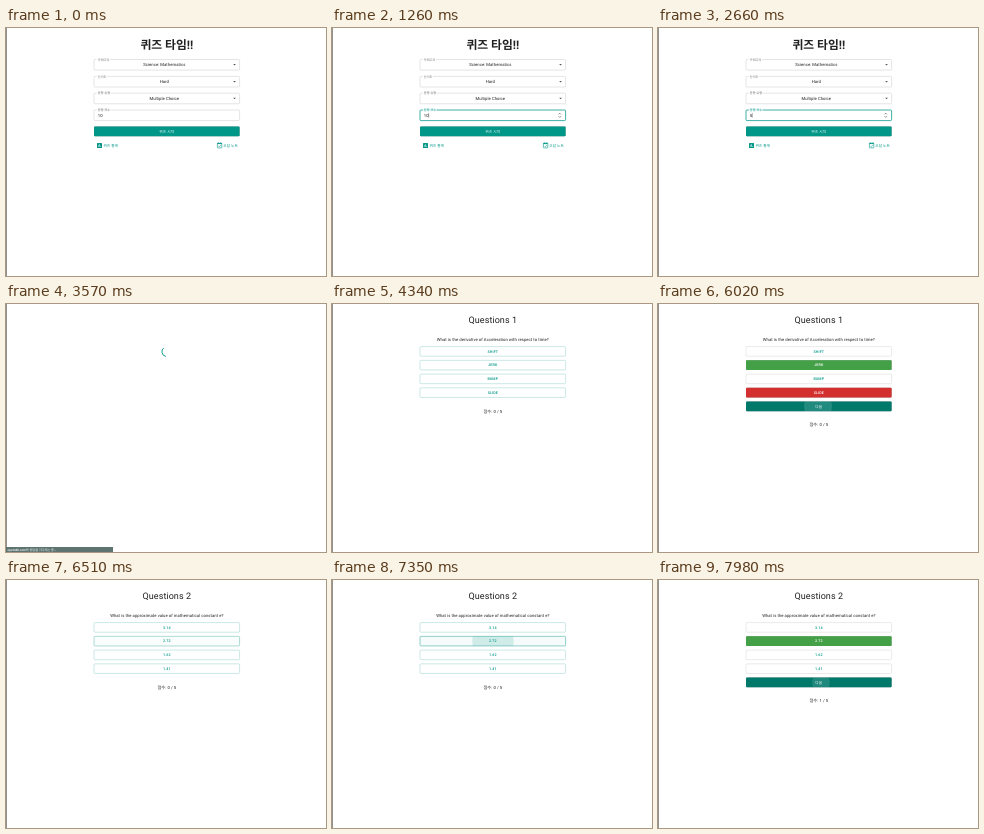
Write an HTML page that moves like this. It is 320x248 px and loops after 8 s.

```html
<!DOCTYPE html>
<html lang="ko">
<head>
<meta charset="utf-8">
<title>Quiz</title>
<style>
html, body { margin: 0; width: 100%; height: 100%; overflow: hidden; background: #fff; }
svg { display: block; width: 100vw; height: 100vh; }
text { font-family: Roboto, "Noto Sans CJK KR", "Noto Sans CJK", sans-serif; text-rendering: geometricPrecision; }
.raised { filter: drop-shadow(0 .5px .5px rgba(0, 0, 0, .4)); }
</style>
</head>
<body>
<svg id="stage" viewBox="0 0 320 248" preserveAspectRatio="none"></svg>
<script>
const LOOP = 8000;
const stage = document.getElementById('stage');
const TEAL = [0, 150, 136], DARK = [0, 121, 107], GREEN = [67, 160, 71], RED = [211, 47, 47];
const TEXT = '#212121';
const LEFT = 88, WIDTH = 145.6, MID = LEFT + WIDTH / 2;
const ROW = 13.75, FIRST = 47.4, BTN_H = 9.6;

const clamp = x => Math.max(0, Math.min(1, x));
const rgb = c => `rgb(${c.map(Math.round)})`;
const mix = (a, b, k) => a.map((v, i) => v + (b[i] - v) * k);
const fade = (t, start, span = 250) => ease(clamp((t - start) / span));

// cubic-bezier timing, solved for x by bisection
function bezier(x1, y1, x2, y2) {
  const at = (a, b, s) => 3 * a * s * (1 - s) ** 2 + 3 * b * s * s * (1 - s) + s ** 3;
  return x => {
    let lo = 0, hi = 1;
    for (let i = 0; i < 22; i++) {
      const m = (lo + hi) / 2;
      if (at(x1, x2, m) < x) lo = m; else hi = m;
    }
    return at(y1, y2, (lo + hi) / 2);
  };
}
const ease = bezier(.4, 0, .2, 1);
const easeInOut = bezier(.42, 0, .58, 1);

function label(str, x, y, size, { fill = TEXT, anchor = 'middle', weight = 400, gap = .009 } = {}) {
  return `<text x="${x}" y="${y + size * .36}" font-size="${size}" fill="${fill}" ` +
    `text-anchor="${anchor}" font-weight="${weight}" letter-spacing="${size * gap}">${str}</text>`;
}

function box(y, h, attrs) {
  return `<rect x="${LEFT}" y="${y - h / 2}" width="${WIDTH}" height="${h}" rx="1" ${attrs}/>`;
}

function ripple(t, { x, y, start, release }, color) {
  const age = t - start;
  if (age < 0 || t > release + 550) return '';
  const k = ease(clamp(age / 550));
  const alpha = (.1 + .2 * k) * (1 - fade(t, release, 550));
  const id = 'clip' + start;
  return `<clipPath id="${id}">${box(y, BTN_H, '')}</clipPath>` +
    `<circle cx="${x}" cy="${y}" r="${82 * k}" fill="${color}" opacity="${alpha}" clip-path="url(#${id})"/>`;
}

function solid(str, y, color) {
  return box(y, BTN_H, `class="raised" fill="${rgb(color)}"`) +
    label(str, MID, y, 3.7, { fill: '#fff', weight: 500, gap: .0286 });
}

function outlined(str, y, hover, answered) {
  const edge = answered ? [213, 213, 213] : mix([150, 209, 202], [38, 160, 147], hover);
  const style = `fill="${rgb(TEAL)}" fill-opacity="${.045 * hover}" stroke="${rgb(edge)}" stroke-width=".5"`;
  return box(y, BTN_H, style) +
    label(str, MID, y, 3.7, { fill: rgb(TEAL), weight: 500, gap: .0286 });
}

function field(name, y, notch, focus) {
  const color = focus ? rgb(TEAL) : '#c4c4c4';
  return box(y, 10.6, `fill="none" stroke="${color}" stroke-width="${focus ? .75 : .45}"`) +
    `<rect x="90.7" y="${y - 6}" width="${notch}" height="1.5" fill="#fff"/>` +
    label(name, 91.8, y - 5.3, 3.1, { anchor: 'start', fill: focus ? rgb(TEAL) : '#666' });
}

function select(name, value, y, notch) {
  return field(name, y, notch, false) + label(value, 158.3, y, 4.23) +
    `<path d="M227.2 ${y - .7}h2.7l-1.35 1.4z" fill="#555"/>`;
}

function links() {
  const color = rgb(TEAL);
  const style = { anchor: 'start', fill: color, weight: 500 };
  return `<rect x="91" y="115" width="5" height="5" rx=".6" fill="${color}"/>` +
    '<path d="M92.4 118.8v-1.8M93.5 118.8v-2.7M94.6 118.8v-1" stroke="#fff" stroke-width=".55"/>' +
    label('퀴즈 통계', 97.4, 117.5, 3.7, style) +
    `<rect x="211.4" y="115.2" width="4.4" height="4.7" rx=".4" fill="none" stroke="${color}" stroke-width=".6"/>` +
    `<path d="M211.3 115.6h4.6M212.4 114.6v1M214.8 114.6v1" stroke="${color}" stroke-width=".9"/>` +
    `<path d="M212.4 117.9l.9 .9 1.6-1.7" fill="none" stroke="${color}" stroke-width=".5"/>` +
    label('오답 노트', 217.3, 117.5, 3.7, style);
}

function home(t) {
  const focus = t >= 1120 && t < 3170;
  const count = t < 2240 ? '10' : t < 2310 ? '1' : t < 2440 ? '' : '5';
  const y = 87.3;
  let s = label('퀴즈 타임!!', MID, 17.2, 11.8, { weight: 600, gap: 0 }) +
    select('카테고리', 'Science: Mathematics', 36.8, 13.3) +
    select('난이도', 'Hard', 53.7, 10.4) +
    select('문항 유형', 'Multiple Choice', 70.5, 14) +
    field('문항 갯수', y, 14, focus) +
    label(count, 91.8, y, 4.23, { anchor: 'start' });
  if (focus) {
    const since = t - (t < 2240 ? 1120 : t < 2310 ? 2240 : t < 2440 ? 2310 : 2440);
    const x = 91.9 + count.length * 2.4;
    if (since % 1000 < 500) s += `<path d="M${x} ${y - 2.4}v4.8" stroke="${TEXT}" stroke-width=".35"/>`;
    s += `<path d="M226.6 ${y - .9}l1.2-1.2 1.2 1.2M226.6 ${y + .9}l1.2 1.2 1.2-1.2" fill="none" stroke="#444" stroke-width=".6"/>`;
  }
  return s + solid('퀴즈 시작', 103.4, mix(TEAL, DARK, fade(t, 3120))) +
    ripple(t, { x: 161, y: 103.4, start: 3170, release: 3240 }, '#fff') + links();
}

function loading(t) {
  const p = (t - 3250) / 1400 % 1;
  const half = easeInOut(p < .5 ? p * 2 : p * 2 - 1);
  const len = p < .5 ? 1 + 99 * half : 100;
  const offset = p < .5 ? -15 * half : -15 - 110 * half;
  let s = `<g transform="translate(160.8 47.7) rotate(${p * 360}) scale(.2405)">` +
    `<circle r="20.2" fill="none" stroke="${rgb(TEAL)}" stroke-width="3.6" ` +
    `stroke-dasharray="${len} 200" stroke-dashoffset="${offset}"/></g>`;
  if (t >= 3390 && t < 3880) {
    s += '<rect y="243" width="107" height="5" fill="#5d7471"/>' +
      label('opentdb.com의 응답을 기다리는 중...', 1.5, 245.4, 3.1, { anchor: 'start', fill: '#fff', weight: 500, gap: 0 });
  }
  return s;
}

const questions = [
  {
    title: 'Questions 1', ask: 'What is the derivative of Acceleration with respect to time?',
    options: ['SHIFT', 'JERK', 'BUMP', 'SLIDE'], right: 1, pick: 3,
    hover: 4370, press: 5180, result: 5390, nextHover: 5700, nextPress: 5900, x: 153, nextX: 160, score: [0, 0]
  },
  {
    title: 'Questions 2', ask: 'What is the approximate value of mathematical constant e?',
    options: ['3.14', '2.72', '1.62', '1.41'], right: 1, pick: 1,
    hover: 6420, press: 7210, result: 7380, nextHover: 7700, nextPress: 7880, x: 161, nextX: 163, score: [0, 1]
  }
];

function question(t, q) {
  const done = t >= q.result;
  const rowY = i => FIRST + ROW * i;
  let s = label(q.title, MID, 15.8, 9, { gap: .0073 }) + label(q.ask, MID, 35.2, 4.23);
  q.options.forEach((name, i) => {
    const y = rowY(i);
    const verdict = i === q.right ? GREEN : i === q.pick ? RED : null;
    if (done && verdict) s += solid(name, y, mix([255, 255, 255], verdict, fade(t, q.result)));
    else s += outlined(name, y, i === q.pick ? fade(t, q.hover) : 0, done);
  });
  s += ripple(t, { x: q.x, y: rowY(q.pick), start: q.press, release: q.result - 50 }, done ? '#fff' : rgb(TEAL));
  if (done) {
    s += solid('다음', rowY(4), mix(TEAL, DARK, fade(t, q.nextHover))) +
      ripple(t, { x: q.nextX, y: rowY(4), start: q.nextPress, release: q.nextPress + 150 }, '#fff');
  }
  return s + label(`점수: ${q.score[+done]} / 5`, MID, done ? 120.8 : 107, 4.23);
}

function draw(t) {
  const page = t < 3250 ? home(t)
    : t < 4130 ? loading(t)
    : question(t, questions[t < 6120 ? 0 : 1]);
  stage.innerHTML = '<rect width="320" height="248" fill="#fff"/>' +
    '<rect width=".8" height="248" fill="#777"/>' + page;
}

const begin = performance.now();
function tick() {
  draw((performance.now() - begin) % LOOP);
  requestAnimationFrame(tick);
}
tick();
</script>
</body>
</html>
```
